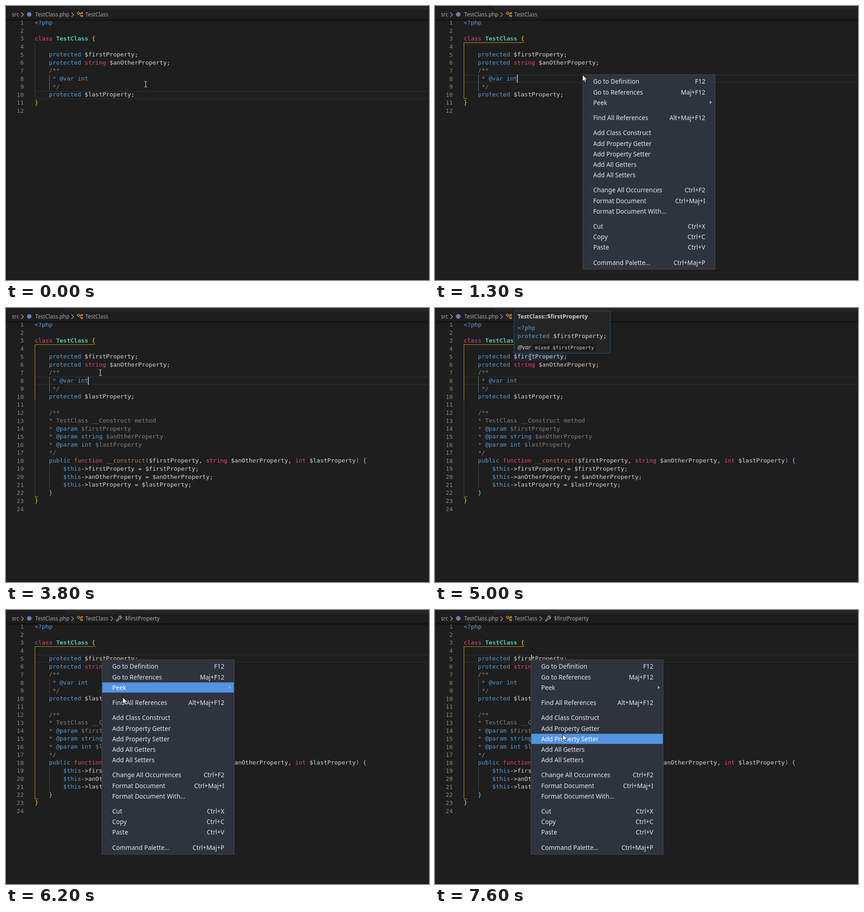
An HTML page that plays this animation: 928x603 px, repeating every 8 s.

```html
<!DOCTYPE html>
<html lang="en">
<head>
<meta charset="utf-8">
<title>Code editor with context menu</title>
<style>
html, body { margin: 0; width: 100%; height: 100%; overflow: hidden; background: #1e1e1e; }
svg { display: block; width: 928px; height: 603px; }
text { white-space: pre; fill: #d4d4d4; }
.code { font: 13px "DejaVu Sans Mono", monospace; }
.ui { font: 11.7px "Noto Sans", sans-serif; fill: #a9a9a9; }
.item { font: 13.6px "Noto Sans", sans-serif; fill: #e2e6ed; }
.item.active { fill: #fff; }
.num { fill: #858585; }
.kw { fill: #569cd6; }
.type { fill: #ee4370; }
.name { fill: #4ec9b0; font-weight: bold; }
.gold { fill: #ffd700; }
.rem { fill: #808080; }
.fn { fill: #ce7148; }
.paren { fill: #c583d0; }
.brace { fill: #87cefa; }
</style>
</head>
<body>
<svg id="stage" viewBox="0 0 928 603">
  <defs>
    <linearGradient id="fade" x2="0" y2="1">
      <stop stop-color="#000" stop-opacity=".5"/><stop offset="1" stop-color="#000" stop-opacity="0"/>
    </linearGradient>
    <filter id="shadow" x="-10%" y="-10%" width="120%" height="120%">
      <feDropShadow dx="0" dy="0" stdDeviation="3" flood-color="#000" flood-opacity=".55"/>
    </filter>
  </defs>
</svg>
<script>
const LOOP = 8000, CHAR = 7.826, LEFT = 63, PITCH = 17.63;
const stage = document.getElementById("stage");

function add(parent, tag, attrs = {}, content) {
  const node = document.createElementNS("http://www.w3.org/2000/svg", tag);
  set(node, attrs);
  if (content !== undefined) node.textContent = content;
  parent.append(node);
  return node;
}
function set(node, attrs) {
  for (const key in attrs) node.setAttribute(key, attrs[key]);
}
function show(node, on) {
  node.setAttribute("display", on ? "inline" : "none");
}
const group = parent => add(parent, "g");
const rect = (parent, x, y, width, height, fill) =>
  add(parent, "rect", { x, y, width, height, fill });
const path = (parent, d, stroke, width = 1, fill = "none") =>
  add(parent, "path", { d, stroke, fill, "stroke-width": width });
const label = (parent, x, y, cls, content) =>
  add(parent, "text", { x, y, class: cls }, content);

const lineTop = n => 27.9 + PITCH * (n - 1);
const baseline = n => lineTop(n) + 13.2;

// Tokens are alternating class and text.
function codeText(parent, x, y, tokens) {
  const node = add(parent, "text", { x, y, class: "code" });
  for (let i = 0; i < tokens.length; i += 2)
    add(node, "tspan", { class: tokens[i] }, tokens[i + 1]);
}
function codeLines(parent, first, lines) {
  lines.forEach((tokens, i) => {
    const y = baseline(first + i);
    set(label(parent, 39, Math.round(y), "code num", first + i), { "text-anchor": "end" });
    codeText(parent, LEFT, Math.floor(y), tokens);
  });
}

const field = name => ["kw", "    protected", "", ` $${name};`];
const param = (type, name) => ["rem", "    * ", "kw", "@param " + type, "rem", "$" + name];
const assign = name => ["kw", "        $this", "", `->${name} = $${name};`];

const head = [
  ["kw", "<?php"],
  [],
  ["type", "class ", "name", "TestClass", "gold", " {"],
  [],
  field("firstProperty"),
  ["kw", "    protected ", "type", "string", "", " $anOtherProperty;"],
  ["rem", "    /**"],
  ["rem", "     * ", "kw", "@var int"],
  ["rem", "     */"],
  field("lastProperty")
];
const closing = [["gold", "}"], []];
const method = [
  [],
  ["rem", "    /**"],
  ["rem", "    * TestClass __Construct method"],
  param("", "firstProperty"),
  param("string ", "anOtherProperty"),
  param("int ", "lastProperty"),
  ["rem", "    */"],
  ["kw", "    public ", "type", "function ", "fn", "__construct", "paren", "(",
    "", "$firstProperty, ", "type", "string", "", " $anOtherProperty, ",
    "type", "int", "", " $lastProperty", "paren", ")", "brace", " {"],
  assign("firstProperty"),
  assign("anOtherProperty"),
  assign("lastProperty"),
  ["brace", "    }"]
];

// Editor
rect(stage, 0, 0, 928, 603, "#1e1e1e");
rect(stage, 129, 0, 799, 8, "#252526");
rect(stage, 0, 602, 928, 1, "#141414");
const activeLine = add(stage, "rect", {
  x: 63.5, width: 880, height: PITCH - 1.4, fill: "none", stroke: "#2b2b2b", "stroke-width": 1.6
});
const dimGuide = path(stage, "", "#404040");
const blockGuide = path(stage, `M95.5 ${lineTop(8)}V${lineTop(10)}`, "#707070");
const methodGuide = path(stage, `M95.5 ${lineTop(19)}V${lineTop(22)}`, "#404040");
const bracketGuide = path(stage, "", "#b89c10");
const wordMark = rect(stage, 173, 99, 109, 17, "#202a35");
codeLines(stage, 1, head);
const shortCode = group(stage), longCode = group(stage);
codeLines(shortCode, 11, closing);
codeLines(longCode, 11, [...method, ...closing]);
const caret = rect(stage, 0, 0, 1.6, PITCH, "#d0d0cc");

// Breadcrumbs
rect(stage, 0, 29, 928, 5, "url(#fade)");
const chevron = (parent, x) => path(parent, `M${x - 2.5} 14l5 5l-5 5`, "#a9a9a9", 1.2);
label(stage, 13, 23, "ui", "src");
chevron(stage, 36);
add(stage, "circle", { cx: 51, cy: 18.5, r: 5, fill: "#6781b2" });
label(stage, 64, 23, "ui", "TestClass.php");
chevron(stage, 146);
path(stage, "M159 13l3 3l-3 3l-3 -3zM161 16h4M163 16v6h2M166.5 13.5l2 2l-2 2l-2 -2zM166.5 20l2 2l-2 2l-2 -2z",
  "#ee9d28", 1.2);
label(stage, 174, 23, "ui", "TestClass");
const memberCrumb = group(stage);
chevron(memberCrumb, 232);
path(memberCrumb, "M252 13a3.6 3.6 0 0 0 -4.6 4.6l-5 5a1.2 1.2 0 0 0 1.8 1.8l5 -5a3.6 3.6 0 0 0 4.5 -4.5l-2.2 2l-1.7 -1.7z",
  "#b5b5b5", 1.1);
label(memberCrumb, 261, 23, "ui", "$firstProperty");

// Hover card
const card = group(stage);
set(rect(card, 173.5, 6.5, 211, 93, "#252526"), { stroke: "#25517f" });
label(card, 181, 23, "item", "TestClass::$firstProperty")
  .setAttribute("style", "font-size:12.7px;font-weight:bold;fill:#ccc");
codeText(card, 181, 48, ["kw", "<?php"]);
codeText(card, 181, 66, ["kw", "protected", "", " $firstProperty;"]);
label(card, 181, 91, "item", "@var")
  .setAttribute("style", "font-size:12.7px;font-style:italic;fill:#ccc");
set(rect(card, 215, 79, 138, 16, "#1a1a1a"), { rx: 2.5 });
label(card, 219, 91, "code", "mixed $firstProperty").setAttribute("style", "font-size:10.8px;fill:#ccc");

// Context menu
const entries = [
  [["Go to Definition", "F12"], ["Go to References", "Maj+F12"], ["Peek"]],
  [["Find All References", "Alt+Maj+F12"]],
  [["Add Class Construct"], ["Add Property Getter"], ["Add Property Setter"],
    ["Add All Getters"], ["Add All Setters"]],
  [["Change All Occurrences", "Ctrl+F2"], ["Format Document", "Ctrl+Maj+I"], ["Format Document With..."]],
  [["Cut", "Ctrl+X"], ["Copy", "Ctrl+C"], ["Paste", "Ctrl+V"]],
  [["Command Palette...", "Ctrl+Maj+P"]]
];
const ROW = 23.2, GAP = 10.1;
const menu = group(stage);
const blank = rect(menu, 0, 0, 291, 429, "#fff");
blank.setAttribute("filter", "url(#shadow)");
const panel = group(menu);
set(rect(panel, .5, .5, 290, 428, "#2f333d"), { stroke: "#4a4e59" });
const marker = rect(panel, 1.4, 0, 288.2, ROW - .9, "#5294e2");
const rows = [];
let rowTop = 3.5;
for (const section of entries) {
  for (const [title, keys] of section) {
    const y = Math.round(rowTop + 16.8);
    const labels = [label(panel, 23, y, "item", title)];
    if (keys) {
      const shortcut = label(panel, 269, y, "item", keys);
      shortcut.setAttribute("text-anchor", "end");
      labels.push(shortcut);
    }
    if (title === "Peek")
      path(panel, `M279 ${rowTop + 8}l4.5 3.5l-4.5 3.5z`, "none", 0, "#a9afba");
    rows.push({ top: rowTop, labels });
    rowTop += ROW;
  }
  rowTop += GAP;
}

// Pointers
const beam = group(stage);
const beamShape = "M-3 -6h2q1 0 1 1q0 -1 1 -1h2M0 -5v10M-3 6h2q1 0 1 -1q0 1 1 1h2";
path(beam, beamShape, "#111", 2.8);
path(beam, beamShape, "#eee", 1.1);
const arrow = group(stage);
path(arrow, "M.5 .5v14.5l3.4 -3.2l2.3 5.4l2.6 -1.1l-2.3 -5.2h4.7z", "#000", 1, "#fff");

// Each cue overrides part of the state from its time on.
const cues = [
  [0, { pointer: "beam", at: [306.5, 172], line: 10, caret: false, menu: null, row: -1,
        bracket: false, built: false, hover: false, member: false }],
  [400, { at: [322, 155] }],
  [600, { at: [323, 153] }],
  [700, { at: [323, 152] }],
  [1100, { pointer: "arrow", at: [323, 151], menu: [324, 150.5], blank: true }],
  [1200, { line: 8, caret: true, bracket: true }],
  [1300, { blank: false }],
  [1500, { at: [327, 156], row: 0 }],
  [1600, { at: [338, 172], caret: false }],
  [1700, { at: [352, 195], row: 1 }],
  [1800, { at: [365, 217], row: 2 }],
  [1900, { at: [376, 237], row: 3 }],
  [2000, { at: [385, 255], row: 3 }],
  [2100, { at: [391, 268], row: 4, caret: true }],
  [2200, { at: [394, 274] }],
  [2600, { caret: false }],
  [3200, { pointer: "beam", at: [309, 305], menu: null, row: -1, built: true }],
  [3400, { at: [237, 205] }],
  [3500, { at: [202, 157] }],
  [3800, { at: [207, 142], caret: true }],
  [3900, { at: [214, 125] }],
  [4100, { at: [215, 118], caret: false }],
  [4300, { at: [217, 114] }],
  [4400, { at: [212, 110] }],
  [4500, { at: [209, 108] }],
  [4800, { caret: true }],
  [5000, { caret: false, hover: true }],
  [5500, { pointer: "arrow", at: [209.5, 109], menu: [210, 109], blank: true }],
  [5700, { blank: false, hover: false, member: true, line: 5, caret: true }],
  [5900, { at: [216, 120], row: 0 }],
  [6200, { at: [255.5, 191.5], row: 2, caret: false }],
  [6400, { at: [268, 232], row: 3 }],
  [6500, { at: [274, 250], row: 4, caret: true }],
  [6700, { at: [277, 258], row: 5 }],
  [6800, { at: [278, 263] }],
  [6900, { at: [279, 267] }],
  [7000, { at: [279, 269], caret: false }],
  [7200, { at: [279, 271] }],
  [7300, { at: [279.5, 273], row: 6 }],
  [7600, { caret: true }]
];
const caretColumn = { 5: 19, 8: 15, 10: 28 };

function renderMenu({ menu: place, blank: loading, row }) {
  show(menu, place);
  if (!place) return;
  menu.setAttribute("transform", `translate(${place})`);
  show(blank, loading);
  show(panel, !loading);
  show(marker, row >= 0);
  if (row >= 0) marker.setAttribute("y", rows[row].top + .5);
  rows.forEach(({ labels }, i) =>
    labels.forEach(node => node.classList.toggle("active", i === row)));
}

function render(time) {
  const state = {};
  for (const [start, change] of cues) if (start <= time) Object.assign(state, change);

  show(shortCode, !state.built);
  show(longCode, state.built);
  show(methodGuide, state.built);
  show(memberCrumb, state.member);
  show(card, state.hover);
  show(wordMark, state.hover);
  activeLine.setAttribute("y", Math.round(lineTop(state.line)) + .7);
  blockGuide.setAttribute("stroke", state.line === 5 ? "#404040" : "#707070");

  const end = Math.round(lineTop(state.built ? 23 : 11)) - .5;
  const goldEnd = state.member ? end : Math.round(lineTop(11)) - .5;
  dimGuide.setAttribute("d", `M63.5 81V${end}`);
  bracketGuide.setAttribute("d", `M196 80.5H63.5V${goldEnd}M63 ${end}h7.5`);
  show(bracketGuide, state.bracket);

  show(caret, state.caret);
  set(caret, { x: LEFT + caretColumn[state.line] * CHAR - .6, y: lineTop(state.line) });

  renderMenu(state);

  show(beam, state.pointer === "beam");
  show(arrow, state.pointer === "arrow");
  (state.pointer === "beam" ? beam : arrow).setAttribute("transform", `translate(${state.at})`);
}

const began = performance.now();
function tick() {
  render((performance.now() - began) % LOOP);
  requestAnimationFrame(tick);
}
tick();
</script>
</body>
</html>
```
